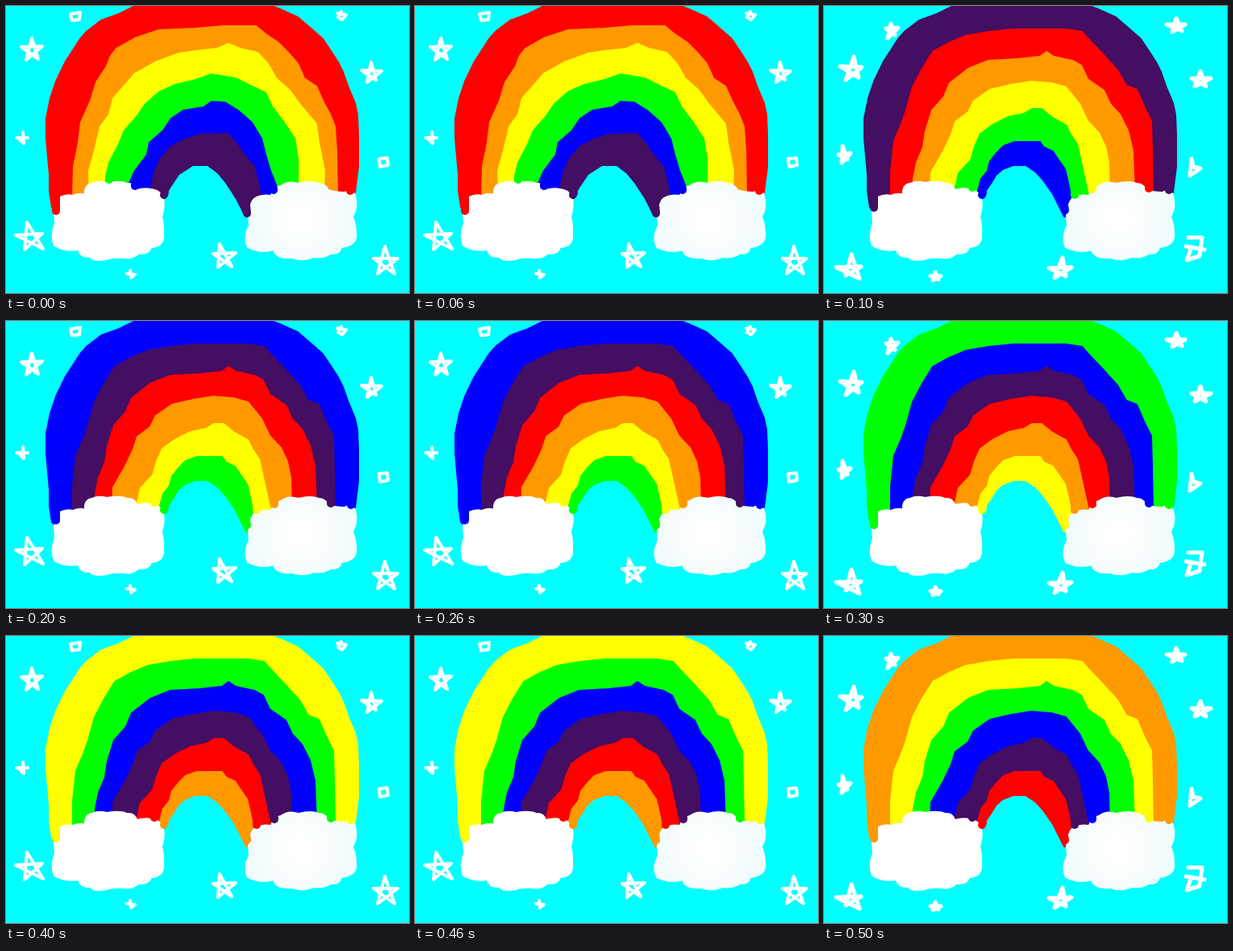
Animation, 500 px wide and 357 px high, one loop 0.6 s. Source, as an HTML page with a canvas:

```html
<!DOCTYPE html>
<html>
<head>
<meta charset="utf-8">
<style>
html, body { margin: 0; width: 500px; height: 357px; overflow: hidden; background: #0ff; }
canvas { display: block; }
</style>
</head>
<body>
<canvas id="stage" width="500" height="357"></canvas>
<script>
const ctx = document.getElementById('stage').getContext('2d');
const colors = ['#f00', '#f90', '#ff0', '#0f0', '#00f', '#440e62'];
const paths = list => list.map(d => new Path2D(d));

// Nested outlines, outermost first; the last one is the sky under the arch.
const outer = 'M62 255L57 250L54 230L54 210L50 165L50 140L55 115L62 94L74 69L85 52L92 41L101 31L118 18L140 10L162 -1L327 -1L340 4L362 14L376 26L393 41L403 56L412 70L418 82L425 102L433 121L436 135L437 160L437 200L433 232Z';

const wideArch = paths([
  outer,
  'M83 240L84 200L90 170L93 145L105 118L112 95L125 75L130 62L137 53L160 40L190 30L235 28L270 25L310 25L322 35L337 45L350 58L362 72L370 90L385 100L393 118L402 135L408 150L410 180L411 236Z',
  'M104 240L103 205L110 180L117 150L128 135L133 115L148 98L160 84L185 70L215 59L235 56L262 53L276 47L290 53L312 58L325 72L335 90L352 105L365 123L385 147L388 170L395 205L394 236Z',
  'M123 240L124 212L128 195L140 172L147 155L162 138L173 122L190 107L210 98L235 92L255 85L285 90L305 100L322 108L330 125L345 145L358 165L362 190L362 236Z',
  'M153 240L153 221L160 205L175 185L178 170L195 155L205 140L220 130L245 126L255 119L272 120L288 130L305 145L317 165L322 185L328 205L338 230L335 240Z',
  'M180 240L180 226L185 205L192 190L205 175L220 167L240 160L275 159L287 172L295 185L308 200L313 220L316 236L305 256L299 262Z',
  'M196 240L205 225L215 210L232 199L250 199L262 208L272 220L285 240L294 258L298 264L188 264Z'
]);

const arch = paths([
  outer,
  'M83 240L83 205L87 168L96 147L102 130L110 101L122 78L135 57L155 46L176 37L205 32L235 29L300 29L320 32L327 40L345 59L364 80L375 99L388 104L397 125L406 143L407 180L408 236Z',
  'M111 240L111 215L115 195L123 176L126 156L134 130L149 113L156 96L179 78L204 68L240 66L268 63L276 57L285 63L308 68L319 74L327 91L347 105L355 122L367 135L377 155L383 180L385 236Z',
  'M132 240L133 207L148 181L158 160L163 144L179 132L186 118L206 104L232 98L257 94L282 96L300 101L317 122L327 143L341 158L349 175L353 195L354 236Z',
  'M162 240L163 226L167 208L182 192L187 175L194 159L209 148L229 138L248 134L258 128L270 128L282 138L300 148L306 160L314 172L318 190L322 208L329 240Z',
  'M190 240L191 230L195 215L203 205L206 193L214 183L223 174L237 169L268 169L273 176L284 181L290 190L299 203L303 220L306 235L305 256L299 262Z',
  'M196 240L201 231L208 221L214 211L222 204L235 199L250 199L262 207L271 217L283 234L294 256L298 264L188 264Z'
]);

// Brush ends lying over the clouds: band, x, y.
const wideTips = [[0, 427, 230], [3, 128, 216], [4, 160, 224], [4, 332, 229]];
const tips = [[1, 403, 227], [4, 184, 226], [3, 333, 228], [4, 311, 235]];
const tailEnds = [255, 251, 248, 254, 252, 252];

const leftCloud = new Path2D('M60 257Q61 243 67 238Q75 234 83 236Q92 232 98 235Q97 222 107 221Q115 217 125 220Q142 217 150 221Q160 220 162 229Q172 226 180 228Q190 229 192 235Q199 243 193 262Q196 274 195 283Q197 299 180 300Q178 309 164 308Q157 315 145 313Q132 312 125 315Q108 318 105 312Q92 313 90 303Q73 306 60 298Q55 285 61 270Z');
const rightCloud = new Path2D('M301 262Q303 243 309 239Q318 234 329 236Q332 225 341 224Q350 217 363 221Q378 217 388 221Q396 221 400 229Q409 232 420 232Q430 226 433 236Q437 250 430 262Q434 272 434 282Q436 298 416 300Q414 309 403 308Q394 314 382 312Q366 318 356 313Q335 315 332 303Q317 308 300 300Q294 288 302 273Z');
const shade = ctx.createRadialGradient(365, 265, 12, 365, 265, 75);
shade.addColorStop(0, '#fff');
shade.addColorStop(1, '#effbfc');

const stars = [
  paths([
    'M80 10L92 8L91 17L82 18Z', 'M411 9L422 11L417 17L412 14L416 7',
    'M32 40L25 67L45 50L19 51L40 66Z', 'M453 70L448 95L466 81L441 80L459 92Z',
    'M13 164L27 164M21 157L22 171L17 166', 'M463 190L473 189L474 198L464 200Z',
    'M26 269L23 303L45 283L12 285L46 302Z', 'M265 296L263 325L285 307L257 308L280 324Z',
    'M470 299L461 333L486 314L456 314L482 333Z', 'M150 333L160 334L155 338L154 329'
  ]),
  paths([
    'M83 22L79 40L92 27L77 28L88 36Z', 'M437 15L432 32L448 23L425 23L444 31Z',
    'M37 63L27 92L47 76L20 75L43 89Z', 'M467 81L460 100L480 90L456 90L474 100Z',
    'M23 174L22 195L33 183L18 185L29 191Z', 'M456 190L454 211L467 202L458 200Z',
    'M34 309L27 335L46 324L15 325L44 339Z', 'M452 288L469 288L466 311L450 316L456 300L449 299L472 303',
    'M296 313L286 338L307 325L279 326L300 336Z', 'M138 331L135 341L145 336L132 336L142 340Z'
  ])
];

function stroke(path, color, width) {
  ctx.strokeStyle = color;
  ctx.lineWidth = width;
  ctx.stroke(path);
}

function fill(path, color, edge = 0) {
  ctx.fillStyle = color;
  ctx.fill(path);
  if (edge) stroke(path, color, edge);
}

function draw(step) {
  const wide = step === 0;
  const bandColor = i => colors[(i - step + 6) % 6];
  const brush = (i, d) => stroke(new Path2D(d), bandColor(i), 10);

  ctx.fillStyle = '#0ff';
  ctx.fillRect(0, 0, 500, 357);
  (wide ? wideArch : arch).forEach((p, i) => fill(p, i < 6 ? bandColor(i) : '#0ff', i < 6 ? 2 : 0));
  fill(leftCloud, '#fff', 2);
  fill(rightCloud, shade, 2);

  brush(0, `M62 236L62 ${tailEnds[step]}`);
  brush(0, 'M428 222L428 229');
  brush(5, 'M197 232L196 235');
  brush(5, `M298 248L299 ${wide ? 258 : 254}`);
  for (const [i, x, y] of wide ? wideTips : tips) brush(i, `M${x} ${y - 2}L${x} ${y}`);

  const odd = step % 2;
  for (const s of stars[odd]) stroke(s, '#fff', odd ? 5 : 4);
}

ctx.lineCap = ctx.lineJoin = 'round';
function tick() {
  draw(Math.floor(performance.now() / 100) % 6);
  requestAnimationFrame(tick);
}
tick();
</script>
</body>
</html>
```
